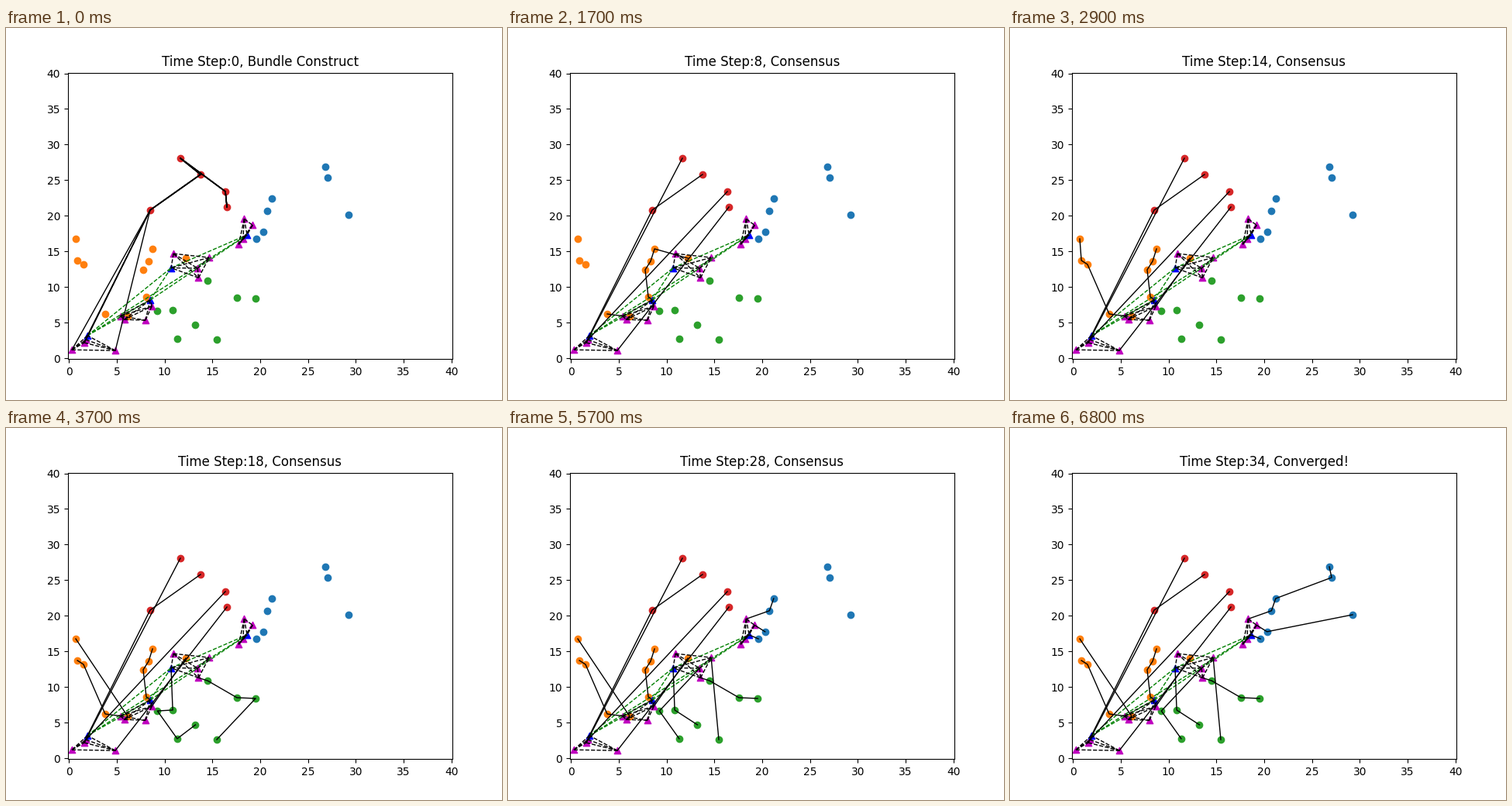
A matplotlib script for the animation above (6.9 s loop, 640 by 480 pixels).

```python
from itertools import combinations

import matplotlib.pyplot as plt
import numpy as np
from matplotlib.animation import FuncAnimation

DISCOUNT = 0.95
STARTS = [0, 7, 17, 27, 34]   # first time step of each team, then the end

# One team per entry: task colour, tasks, agents (the last agent is the leader)
TEAMS = [
    ("C3",
     [(11.65, 28.09), (13.76, 25.81), (8.49, 20.81), (16.36, 23.42),
      (16.52, 21.24)],
     [(0.31, 1.2), (1.6, 2.2), (1.78, 2.62), (4.85, 1.1), (1.93, 3.2)]),
    ("C1",
     [(0.71, 16.78), (0.88, 13.74), (1.52, 13.19), (3.79, 6.23),
      (6.14, 5.91), (7.76, 12.43), (8.33, 13.63), (8.74, 15.37),
      (8.09, 8.63), (12.22, 14.06)],
     [(5.38, 5.95), (5.78, 5.45), (8.0, 5.35), (8.67, 7.32), (8.5, 8.2)]),
    ("C2",
     [(9.25, 6.66), (10.85, 6.78), (11.32, 2.76), (13.23, 4.71),
      (15.46, 2.64), (14.5, 10.9), (17.57, 8.52), (19.52, 8.41)],
     [(10.93, 14.7), (13.45, 12.65), (13.55, 11.3), (14.66, 14.15),
      (10.68, 12.7)]),
    ("C0",
     [(26.81, 26.9), (27.05, 25.38), (29.24, 20.16), (21.2, 22.44),
      (20.76, 20.72), (20.3, 17.78), (19.6, 16.78)],
     [(18.33, 19.57), (19.2, 18.7), (18.2, 16.75), (17.75, 16.0),
      (18.63, 17.33)]),
]


class Agent:
    """Bidder of the consensus-based bundle algorithm."""

    def __init__(self, id, pos, tasks):
        self.id, self.pos, self.tasks = id, np.array(pos), tasks
        self.bids = np.zeros(len(tasks))
        self.winners = np.full(len(tasks), -1)
        self.bundle, self.path = [], []

    def route(self, path):
        return np.vstack([self.pos, self.tasks[path]]) if path else self.pos[None]

    def score(self, path):
        legs = np.diff(self.route(path), axis=0)
        return np.sum(DISCOUNT ** np.cumsum(np.hypot(legs[:, 0], legs[:, 1])))

    def build(self):
        while True:
            base = self.score(self.path)
            best = None
            for j in range(len(self.tasks)):
                if j in self.bundle:
                    continue
                options = [self.path[:n] + [j] + self.path[n:]
                           for n in range(len(self.path) + 1)]
                gains = [self.score(p) - base for p in options]
                n = int(np.argmax(gains))
                if gains[n] > self.bids[j] and (not best or gains[n] > best[0]):
                    best = gains[n], j, options[n]
            if not best:
                return
            gain, j, self.path = best
            self.bundle.append(j)
            self.bids[j], self.winners[j] = gain, self.id

    def agree(self, messages):
        for j in range(len(self.tasks)):
            for k, (bids, winners) in enumerate(messages):
                if k == self.id:
                    continue
                held = self.winners[j]
                if winners[j] == k:
                    if held in (k, -1) or bids[j] > self.bids[j]:
                        self.bids[j], self.winners[j] = bids[j], k
                elif held == k:
                    self.bids[j], self.winners[j] = 0, -1
        for n, j in enumerate(self.bundle):
            if self.winners[j] != self.id:
                lost = self.bundle[n + 1:]
                self.bids[lost], self.winners[lost] = 0, -1
                self.bundle = self.bundle[:n]
                break
        self.path = [j for j in self.path if j in self.bundle]


def simulate(tasks, positions, steps):
    """Routes of all agents after each bundle and each consensus phase."""
    agents = [Agent(i, p, np.array(tasks)) for i, p in enumerate(positions)]
    history = []

    def record():
        history.append([a.route(a.path) for a in agents])

    for _ in range(steps):
        for a in agents:
            a.build()
        record()
        messages = [(a.bids.copy(), a.winners.copy()) for a in agents]
        for a in agents:
            a.agree(messages)
        record()
    return history


histories = [simulate(tasks, agents, STARTS[g + 1] - STARTS[g])
             for g, (_, tasks, agents) in enumerate(TEAMS)]

fig, ax = plt.subplots(figsize=(6.4, 4.8), dpi=100)
ax.set_xlim(-0.1, 40.1)
ax.set_ylim(-0.1, 40.1)
title = ax.set_title("")


def link(points, style):
    for (x0, y0), (x1, y1) in combinations(points, 2):
        ax.plot([x0, x1], [y0, y1], style, lw=1)


for color, tasks, agents in TEAMS:
    ax.scatter(*zip(*tasks), color=color)
for _, _, agents in TEAMS:
    ax.scatter(*zip(*agents[:-1]), color="m", marker="^")
    ax.scatter(*agents[-1], color="b", marker="^")
link([agents[-1] for _, _, agents in TEAMS], "g--")
for _, _, agents in TEAMS:
    link(agents, "k--")

lines = [[ax.plot([], [], "k-", lw=1)[0] for _ in agents]
         for _, _, agents in TEAMS]


def update(frame):
    step, phase = divmod(frame, 2)
    name = ("Bundle Construct", "Consensus")[phase]
    if step == STARTS[-1]:
        name = "Converged!"
    title.set_text(f"Time Step:{step}, {name}")
    for start, history, team in zip(STARTS, histories, lines):
        t = frame - 2 * start
        for i, line in enumerate(team):
            route = history[min(t, len(history) - 1)][i] if t >= 0 else None
            if route is None or len(route) < 2:
                line.set_data([], [])
            else:
                line.set_data(route[:, 0], route[:, 1])
    return [title, *sum(lines, [])]


anim = FuncAnimation(fig, update, frames=2 * STARTS[-1] + 1, interval=100,
                     init_func=lambda: update(0), repeat=True, repeat_delay=0)
plt.show()
```
